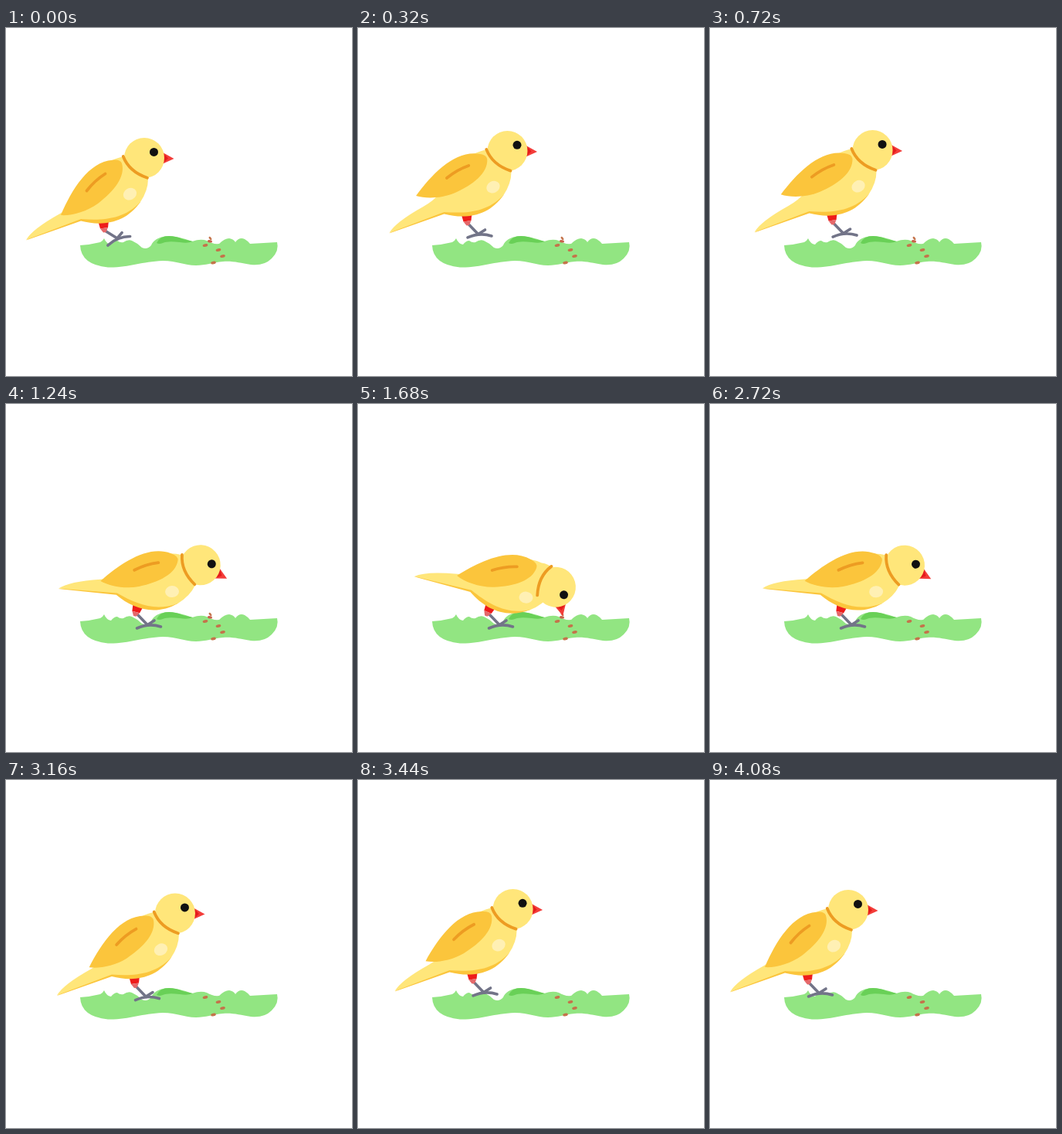
Write an HTML page with a canvas that moves like this. It is 448 px wide and 450 px high and loops after 4120 ms.

```html
<!DOCTYPE html>
<html lang="en">
<head>
<meta charset="utf-8">
<title>Pecking bird</title>
<style>
html, body { margin: 0; width: 100%; height: 100%; overflow: hidden; background: #fff; }
canvas { display: block; width: 448px; height: 450px; }
</style>
</head>
<body>
<canvas id="stage" width="448" height="450"></canvas>
<script>
const ctx = document.getElementById('stage').getContext('2d');
const LOOP = 4120;
const HIP = [127, 251.5], NECK = [162.7, 182.7], SHOULDER = [135, 189];

const GREEN = '#92e582', YELLOW = '#ffe67a', AMBER = '#fbc53c',
      ORANGE = '#ed9c22', GREY = '#727488', SEED = '#c4734a';

const shape = d => new Path2D(d);
const paths = {
  grass: shape('M96 281 Q110 280 122 277 Q125 276 127 272 Q130 279 136 280 Q140 275 144 275 Q148 278 152 277 Q158 273 163 275 Q170 278 176 284 Q183 287 188 281 Q192 271 208 269 Q223 269 241 276 Q252 272 260 275 Q268 280 276 279 Q283 272 289 272 Q295 273 297 277 Q302 270 309 273 Q314 276 316 279 L351 277 Q354 288 344 298 Q334 308 317 306 C303 304 294 301 281 302 C267 303 259 307 246 307 C230 307 222 301 203 301 C175 302 160 310 132 309.5 Q97 306 96 281Z'),
  hill: shape('M195 278 Q199 269 211 269 Q220 269 229 273 L242 276 Q235 279 225 277 Q209 275 203 278 Q198 280 195 278Z'),
  shade: shape('M26 274.5 L97 249.5 C126 257 155 252 174 225 L160 215 L90 235Z'),
  body: shape('M26 274 Q34 260 70 240 Q84 232 92 222 C108 188 130 170 152 166.5 Q160 162.5 167 164 Q184 176 184 195 Q184 210 174 225 C152 248 125 249 97 247Z'),
  wing: shape('M71 242 C85 209 107 173 138 170.7 Q148 169.5 150 175 C155 192 140 211 119 227 C104 238 84 243 71 242Z'),
  feather: shape('M104.5 210.5 Q115 197 128.5 188.5'),
  thigh: shape('M119 249 L133 249 L132 258 L122 259.5Z'),
  knee: shape('M122 259.5 L132 258 L129.5 264 L126 264.5Z'),
  beak: shape('M203 161 L217.5 169 L203 175.5Z'),
  beakBase: shape('M203 161 L210 168.5 L203 175.5Z'),
  collar: shape('M151.7 166 Q159.5 186 183 193.7'),
  toes: shape('M127.5 280 Q143 273 158.5 278 M140.5 276 L150 270')
};

const clamp = x => Math.max(0, Math.min(1, x));
const span = (t, a, b) => clamp((t - a) / (b - a));
const ease = x => x * x * (3 - 2 * x);
const ramp = (t, a, b) => ease(span(t, a, b));
const bell = (t, a, b) => Math.sin(Math.PI * span(t, a, b));

// start, end, horizontal step, vertical step, height
const hops = [
  [100, 420, 21, 0, 11],
  [560, 880, 21, 10, 15],
  [3130, 3450, -21, -10, 15],
  [3630, 3950, -21, 0, 11]
];

function pose(t) {
  const p = { x: 0, y: 0, wing: 0 };
  for (const [a, b, dx, dy, h] of hops) {
    const k = span(t, a, b);
    p.x += dx * k;
    p.y += dy * k - h * bell(t, a, b);
    p.wing += 14 * bell(t, a, b + 40);
  }
  p.lean = 25.7 * (ramp(t, 980, 1260) - ramp(t, 2710, 2990));
  p.dip = 9 * (bell(t, 1520, 1880) ** 2 + bell(t, 2100, 2460) ** 2);
  p.head = 40 * (ramp(t, 1280, 1520) - ramp(t, 2460, 2700));
  p.push = 1 - ramp(t, 0, 120);
  return p;
}

function fill(path, color) {
  ctx.fillStyle = color;
  ctx.fill(path);
}

function stroke(path, color, width) {
  ctx.strokeStyle = color;
  ctx.lineWidth = width;
  ctx.stroke(path);
}

function ellipse(x, y, rx, ry, color, turn = 0) {
  ctx.fillStyle = color;
  ctx.beginPath();
  ctx.ellipse(x, y, rx, ry, turn, 0, 2 * Math.PI);
  ctx.fill();
}

function turned([x, y], degrees, paint) {
  ctx.save();
  ctx.translate(x, y);
  ctx.rotate(degrees * Math.PI / 180);
  ctx.translate(-x, -y);
  paint();
  ctx.restore();
}

function drawGround(t) {
  fill(paths.grass, GREEN);
  fill(paths.hill, '#69d057');
  for (const [x, y] of [[258, 281], [275, 287], [280.5, 295], [268.5, 303.5]])
    ellipse(x, y, 3.4, 1.9, SEED, -0.25);
  if (t < 1700) ellipse(264.5, 272, 2.6, 1.4, SEED, 0.9);
  if (t < 2280) ellipse(264, 275.8, 3, 1.7, '#c8604a', 0.2);
}

function drawLeg(p) {
  const dx = 2 * p.push, dy = -3.5 * p.push;
  stroke(shape(`M128 262 L${141.5 + dx * 1.7} ${276 + dy}`), GREY, 3.6);
  ctx.save();
  ctx.translate(dx, dy);
  turned([143, 275], -18 * p.push, () => stroke(paths.toes, GREY, 3.6));
  ctx.restore();
  turned([126, 257], 0.9 * (p.lean + p.dip), () => {
    fill(paths.thigh, '#ee1c1b');
    fill(paths.knee, '#e5686a');
  });
}

function drawHead() {
  fill(paths.beak, '#f33d3a');
  fill(paths.beakBase, '#e51c1c');
  ellipse(179, 168, 26, 26, YELLOW);
  stroke(paths.collar, ORANGE, 3.8);
  ellipse(191.5, 160.4, 5.5, 5.5, '#111');
}

function drawBird(p) {
  ctx.save();
  ctx.translate(p.x, p.y);
  drawLeg(p);
  turned(HIP, p.lean + p.dip, () => {
    fill(paths.shade, AMBER);
    fill(paths.body, YELLOW);
    ellipse(160.5, 214.7, 9, 7.5, '#fff0b4', -0.5);
    turned(SHOULDER, p.wing, () => {
      fill(paths.wing, AMBER);
      stroke(paths.feather, ORANGE, 3.8);
    });
    turned(NECK, p.head, drawHead);
  });
  ctx.restore();
}

function draw(now) {
  const t = now % LOOP;
  ctx.fillStyle = '#fff';
  ctx.fillRect(0, 0, 448, 450);
  ctx.lineCap = 'round';
  ctx.lineJoin = 'round';
  drawGround(t);
  drawBird(pose(t));
}

const start = performance.now();
function tick() {
  draw(performance.now() - start);
  requestAnimationFrame(tick);
}
tick();
</script>
</body>
</html>
```
